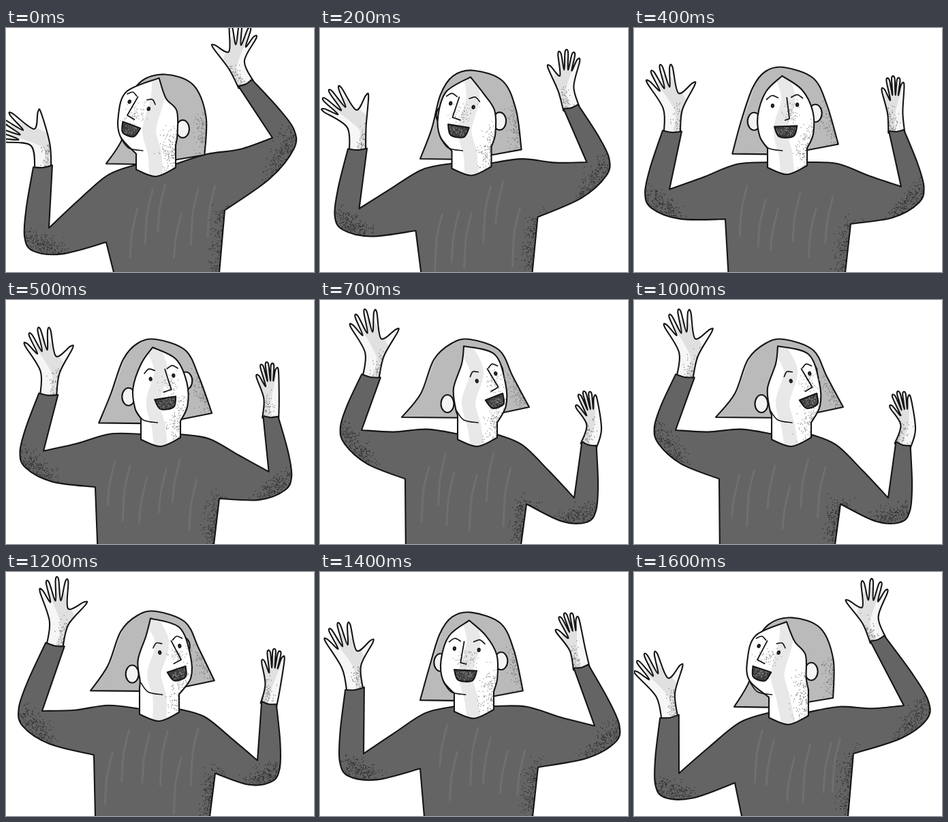
Write an HTML page with a canvas that moves like this. It is 452x360 px and loops after 1700 ms.

```html
<!DOCTYPE html>
<html lang="en">
<head>
<meta charset="utf-8">
<title>Waving woman</title>
<style>
html, body { margin: 0; width: 100%; height: 100%; overflow: hidden; background: #fff; }
canvas { display: block; }
</style>
</head>
<body>
<canvas id="stage" width="452" height="360"></canvas>
<script>
const ctx = document.getElementById('stage').getContext('2d');
const INK = '#151515', SLEEVE = '#646464', HAIR = '#bababa', SHADE = '#e0e0e0';

// Joints of each pose: wrist, elbow crease and armpit of both arms, then the neck.
// The turn of the head runs from -1 (left) to 1 (right); leans are hand angles from upright.
const pose = (left, right, neck, turn, leanLeft, leanRight) => [...left, ...right, ...neck, turn, leanLeft, leanRight];
const poses = [
  pose([54, 204, 63, 295, 147, 316], [351, 81, 391, 162, 321, 269], [220, 208], -0.95, -1, 0.1),
  pose([56, 152, 52, 238, 134, 282], [385, 151, 392, 234, 318, 289], [225, 205], 0.1, -0.28, -0.05),
  pose([75, 112, 61, 192, 125, 264], [395, 212, 373, 292, 303, 301], [231, 205], 1, -0.22, -0.27),
  pose([72, 107, 53, 205, 129, 270], [386, 193, 369, 278, 307, 297], [225, 209], 0.85, -0.05, 0.05),
  pose([51, 172, 64, 268, 147, 290], [383, 139, 403, 227, 320, 288], [226, 205], -0.15, -0.3, -0.33),
  pose([52, 213, 66, 297, 148, 311], [357, 98, 396, 197, 322, 268], [227, 214], -0.85, -0.47, 0.04)
];

// [time in 100 ms steps, place in the pose cycle]
const timeline = [[0, 0], [4, 1], [7, 2], [8.5, 2.3], [10, 2], [12, 3], [14, 4], [16, 5], [17, 6]];

const mix = (a, b, k) => a.map((v, i) => v + (b[i] - v) * k);
const add = (a, b, k = 1) => [a[0] + b[0] * k, a[1] + b[1] * k];
const heading = angle => [Math.sin(angle), -Math.cos(angle)];
const across = ([x, y]) => [-y, x];
function toward(a, b) {
  const d = add(b, a, -1), size = Math.hypot(...d) || 1;
  return [d[0] / size, d[1] / size];
}

function poseAt(step) {
  const n = timeline.findIndex(key => key[0] > step);
  const [t0, p0] = timeline[n - 1], [t1, p1] = timeline[n];
  const place = p0 + (p1 - p0) * (step - t0) / (t1 - t0), index = Math.floor(place);
  return mix(poses[index], poses[(index + 1) % poses.length], place - index);
}

// Smooth path through the points, sharp at the listed corners.
function curve(points, sharp = [], closed = true) {
  const path = new Path2D(), n = points.length;
  const at = i => closed ? points[(i + n) % n] : points[Math.max(0, Math.min(n - 1, i))];
  const isSharp = i => sharp.includes(i % n);
  path.moveTo(...points[0]);
  for (let i = 0; i < (closed ? n : n - 1); i++) {
    const a = at(i), b = at(i + 1);
    const before = isSharp(i) ? a : at(i - 1), after = isSharp(i + 1) ? b : at(i + 2);
    path.bezierCurveTo(...add(a, add(b, before, -1), 1 / 6), ...add(b, add(after, a, -1), -1 / 6), ...b);
  }
  if (closed) path.closePath();
  return path;
}
const openCurve = (points, sharp) => curve(points, sharp, false);

function oval(x, y, rx, ry) {
  const path = new Path2D();
  path.ellipse(x, y, rx, ry, 0, 0, Math.PI * 2);
  return path;
}

let seed;
function random() {
  seed = (seed * 16807) % 2147483647;
  return seed / 2147483647;
}

function line(path, width = 2.1, color = INK) {
  ctx.strokeStyle = color;
  ctx.lineWidth = width;
  ctx.stroke(path);
}

function shape(path, color, inside) {
  ctx.fillStyle = color;
  ctx.fill(path);
  if (inside) {
    ctx.save();
    ctx.clip(path);
    inside();
    ctx.restore();
  }
  line(path);
}

function grain(from, to, spread, count, color) {
  ctx.fillStyle = color;
  const offset = () => (random() + random() + random() - 1.5) * spread;
  for (let i = 0; i < count; i++) {
    const [x, y] = mix(from, to, random());
    ctx.fillRect(x + offset(), y + offset(), 1.2, 1.2);
  }
}

// Fingers fan out around the palm; side is 1 when the thumb points right.
function hand(wrist, elbow, lean, side, size, spread, thumbGap) {
  const up = toward(elbow, wrist), out = across(up);
  const palm = add(wrist, up, 31 * size);
  const fan = (angle, radius) => add(palm, heading(lean + side * angle), radius * size);
  const root = add(wrist, up, -3);
  const points = [add(root, out, -12 * side), add(palm, out, -14 * side * size)];
  for (let i = 0; i < 5; i++) {
    const thumb = i === 4;
    const angle = (i - 2) * spread + (thumb ? thumbGap : 0);
    const tip = fan(angle, thumb ? 46 : 62 - 2.5 * (i - 2) ** 2);
    const width = across(toward(palm, tip));
    points.push(add(tip, width, -2.2 * side), add(tip, width, 2.2 * side));
    if (!thumb) points.push(fan(angle + (i === 3 ? spread + thumbGap : spread) / 2, i === 3 ? 24 : 32));
  }
  const heel = add(palm, out, 13 * side * size), end = add(root, out, 12 * side);
  points.push(heel, end);
  shape(curve(points, [0, points.length - 1]), '#f6f6f6', () => {
    line(openCurve([end, heel, fan(0, 40)]), 22, SHADE);
    grain(end, heel, 14, 120, '#777');
  });
}

// Sleeve outline from armpit round the elbow and cuff to the shoulder.
function sleeve(wrist, elbow, armpit, neck, side, cuff) {
  const up = toward(elbow, wrist), out = across(up);
  const bend = add(add(elbow, up, -41), toward(elbow, armpit), -41);
  const outer = add(wrist, out, side * cuff), inner = add(wrist, out, -side * cuff);
  const rise = (neck[1] - elbow[1]) * 0.1;
  return [
    armpit,
    add(mix(bend, armpit, 0.45), up, -12),
    add(mix(bend, armpit, 0.1), up, -4),
    add(mix(outer, bend, 0.85), out, side * 2),
    add(mix(outer, bend, 0.5), out, side * 4),
    outer, add(wrist, up, -2), inner, elbow,
    add(mix(elbow, neck, 0.33), [0, rise]),
    add(mix(elbow, neck, 0.67), [0, rise - 6]),
    neck
  ];
}

function body(left, right) {
  const hemLeft = [left[0][0] + (left[0][1] - 260) * 0.2, 361], hemRight = [right[0][0] - 8, 361];
  const points = [hemLeft, ...left, ...right.slice().reverse(), hemRight];
  const sharp = [0, 1, 6, 8, 9, 12, 13, 16, 17, 19, 24, 25];
  shape(curve(points, sharp), SLEEVE, () => {
    for (let i = 0; i < 6; i++) {
      const x = hemLeft[0] + 15 + i * 24 + random() * 12, y = 225 + random() * 50;
      line(openCurve([[x + 8, y], [x, y + 35], [x - 3, y + 60 + random() * 30]]), 3, 'rgba(255,255,255,.07)');
    }
    grain(right[0], hemRight, 18, 320, '#2a2a2a');
    for (const arm of [left, right]) grain(arm[1], arm[3], 16, 260, '#2a2a2a');
  });
}

function hair(turn) {
  const l = Math.max(-turn, 0), r = Math.max(turn, 0);
  const points = [
    [147 - 27 * r, 187 - 14 * turn], [158 + 14 * l - 10 * r, 138 + 25 * l], [175 + 4 * l - 8 * r, 88 + 25 * l],
    [193 + 5 * l, 64 + 16 * l], [220 + 14 * l, 58 + 11 * l], [263 + 12 * l, 74 + 10 * l],
    [283 + 11 * l, 113 + 18 * l], [299 + 8 * turn, 173 - 15 * turn], [220 + 12 * turn, 188 - 14 * turn]
  ];
  shape(curve(points, [0, 7, 8]), HAIR, () => {
    line(openCurve(points.slice(1, 3)), 5, 'rgba(255,255,255,.2)');
    grain(points[6], points[7], 16, 190, '#777');
  });
}

function skin(neck, turn) {
  const far = Math.abs(turn), cheekLeft = 180 + 16 * turn, cheekRight = 261 + 11 * turn;
  shape(oval(175 + 12 * far, 136 + 17 * turn, 9.5, 13), '#f4f4f4');
  shape(oval(267 - 8 * far, 128 - 22 * turn, 9.5, 13), '#f4f4f4');
  const top = [218 - 7 * turn, 71 - 3 * turn], base = add(neck, [0, 11]);
  const points = [
    top, [cheekLeft + 12, 94], [cheekLeft, 130], [cheekLeft + 3, 160], [neck[0] - 29, 178 - 8 * turn],
    add(neck, [-29, 1]), base, add(neck, [29, -2]), [neck[0] + 29, 177 + 4 * turn],
    [cheekRight + 1, 156], [cheekRight, 122], [cheekRight - 16, 92 - 12 * turn]
  ];
  shape(curve(points, [0, 4, 5, 7, 8]), '#fff', () => {
    const x = 222 + 4 * turn;
    line(openCurve([top, [x + 4, 105], [x - 8, 150], [x, 185], base]), 20, '#e8e8e8');
    grain(points[9], points[7], 22, 300, '#888');
  });
  line(openCurve([[cheekLeft + 4, 163], [cheekLeft + 15, 177], [cheekLeft + 36, 181]]), 1.6);
}

// Features sit on a plane that slides and tilts as the head turns.
function features(turn) {
  const narrow = 1 - 0.2 * Math.abs(turn), lead = Math.tanh(6 * turn);
  ctx.save();
  ctx.translate(219 + 25 * turn, 114);
  ctx.rotate(-0.38 * turn);
  grain([10, 5], [lead * 8, 18], 14, 60, '#999');
  for (const side of [-1, 1]) {
    const x = side * narrow;
    shape(oval(18.5 * x, 0, 1.6, 2.2), '#555');
    line(openCurve([[10 * x, -11.5], [19 * x, -15], [27 * x, -9.5]]), 1.7);
  }
  line(openCurve([[lead * 6, -11], [lead * 11, 20], [-lead, 22]], [0, 1, 2]), 1.8);
  const wide = 17 * narrow;
  shape(curve([[-wide, 31], [wide, 31], [wide * 0.65, 46], [-wide * 0.6, 46]], [0, 1]), '#3c3c3c', () =>
    grain([-wide, 38], [wide, 38], 12, 110, '#888'));
  ctx.restore();
}

function draw(step) {
  const p = poseAt(step);
  const [wristL, elbowL, pitL, wristR, elbowR, pitR, neck] = [0, 2, 4, 6, 8, 10, 12].map(i => p.slice(i, i + 2));
  const [turn, leanL, leanR] = p.slice(14);
  const open = Math.max(-turn, 0);
  seed = 101 + step * 7919;
  ctx.clearRect(0, 0, 452, 360);
  ctx.lineCap = ctx.lineJoin = 'round';
  hand(wristL, elbowL, leanL, 1, 1.04, 0.23, 0.5);
  hand(wristR, elbowR, leanR, -1, 0.83 + 0.12 * open, 0.16 + 0.09 * open, 0.1 + 0.4 * open);
  body(sleeve(wristL, elbowL, pitL, add(neck, [-27, -7]), -1, 14),
    sleeve(wristR, elbowR, pitR, add(neck, [28, -7]), 1, 11));
  hair(turn);
  skin(neck, turn);
  features(turn);
}

const start = performance.now();
let shown = -1;
function tick() {
  const step = Math.floor((performance.now() - start) % 1700 / 100);
  if (step !== shown) draw(shown = step);
  requestAnimationFrame(tick);
}
tick();
</script>
</body>
</html>
```
